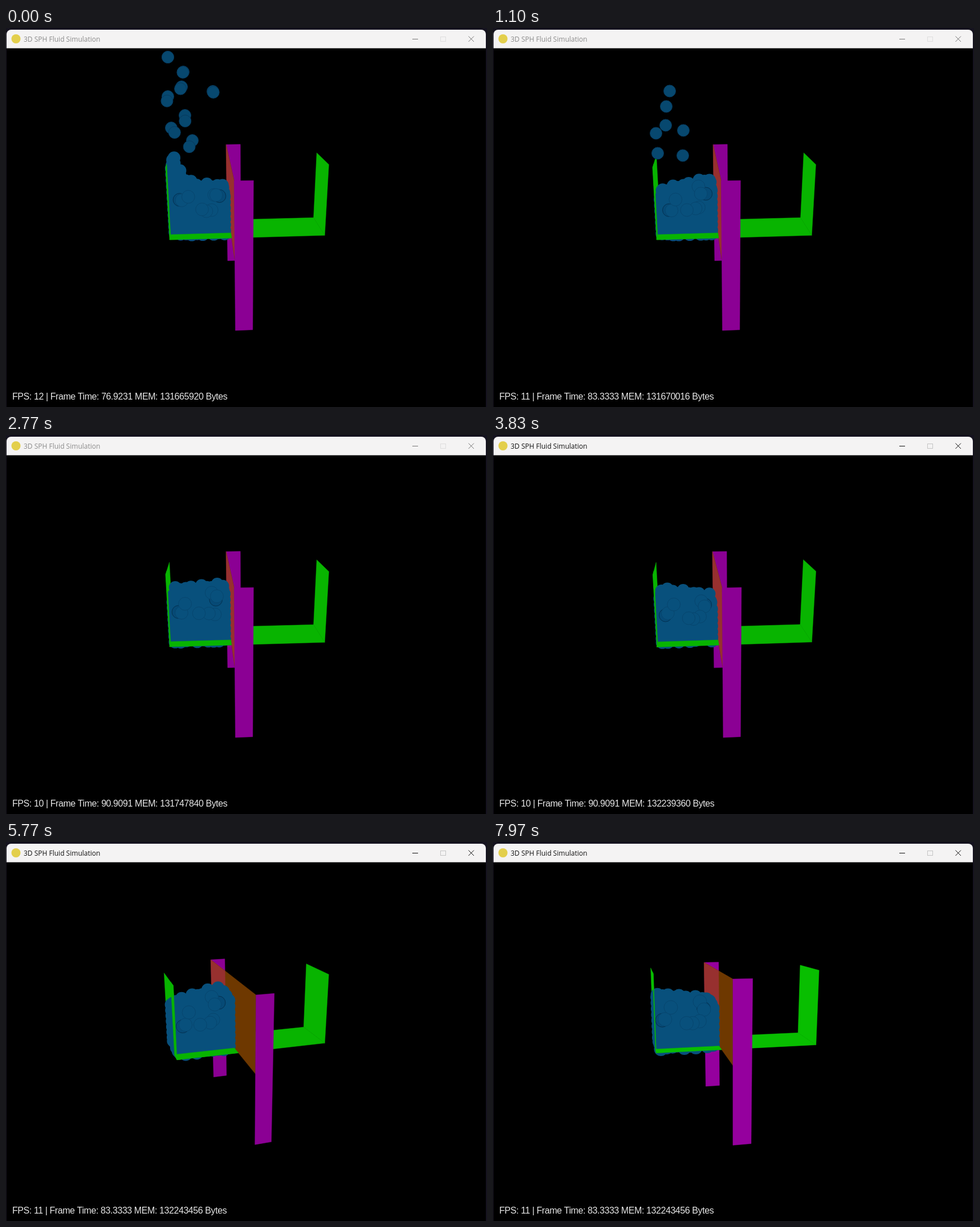
Recreate the animation shown at these times as an HTML page with a canvas. Size 844x664 px, loop 8 s.

```html
<!DOCTYPE html>
<html lang="en">
<head>
<meta charset="utf-8">
<title>3D SPH Fluid Simulation</title>
<style>
  html, body { margin: 0; width: 100%; height: 100%; overflow: hidden; background: #000; }
  canvas { display: block; }
</style>
</head>
<body>
<canvas id="stage" width="844" height="664"></canvas>
<script>
const ctx = document.getElementById('stage').getContext('2d');
const LOOP = 8000, FOCUS_TIME = 3720;
const FOCAL = 880, CENTER_X = 421, CENTER_Y = 350.5;

// Scene in world units: x right, y up, z toward the viewer. The tank floor is y = 0.
const TANK_X = 4.72, TANK_Z = 1.67, HEIGHT = 4.42, POST_Z = 4.95, SHEET_X = -1;
const RADIUS = 0.4, FLUID_LEFT = -4.42, FLUID_RIGHT = -1.4, FLUID_BACK = -1.45, FLUID_FRONT = 1.05;
const BLUE = '#08507c', SPRAY_BLUE = '#07486f', RIM = '#063a5e';

// time, yaw, pitch, distance
const CAMERA = [
  [0, .079, .352, 32], [3750, .079, .352, 32], [4670, .187, .352, 32], [5650, .302, .352, 32],
  [5950, .302, .352, 32], [6600, .277, .24, 30.6], [6750, .277, .24, 30.6], [7600, .199, .24, 30.6]];

// time, mean fluid level, slosh (right side minus left side)
const SLOSH = [[0, 2.4, 0], [1100, 2.5, .7], [2770, 2.8, .2], [4670, 2.2, -1], [5770, 2.9, .7],
  [6670, 2.75, .1], [7970, 2.6, -.35]];

// Screen positions of splashing drops: at the start, and when the second shower is mid-air.
const SPLASH = [[284, 51], [311, 77], [308, 103], [363, 111], [284, 120], [314, 153], [290, 175], [327, 197]];
const SHOWER_TIME = 1.1;
const SHOWER = [[310, 110], [304, 137], [303, 170], [286, 184], [334, 179], [289, 219], [333, 223]];

// time, frames per second, memory
const STATUS = [[0, 12, 131665920], [620, 11, 131670016], [2100, 10, 131747840], [3800, 10, 132239360],
  [4850, 11, 132239360], [5400, 11, 132243456], [6300, 10, 132243456], [7300, 11, 132243456]];

const mix = (a, b, k) => a + (b - a) * k;

function sample(rows, t) {
  const i = rows.findIndex(row => row[0] > t);
  if (i < 0) return rows[rows.length - 1];
  const from = rows[i - 1], to = rows[i], k = (t - from[0]) / (to[0] - from[0]);
  return from.map((v, j) => mix(v, to[j], k));
}

function randomizer(seed) {
  return () => (seed = seed * 16807 % 2147483647) / 2147483647;
}

// Returns a function from world point to [screen x, screen y, pixels per unit].
function makeCamera([, yaw, pitch, distance]) {
  const cy = Math.cos(yaw), sy = Math.sin(yaw), cp = Math.cos(pitch), sp = Math.sin(pitch);
  return ([x, y, z]) => {
    const depth = z * cy - x * sy;
    const scale = FOCAL / (distance - depth * cp - y * sp);
    return [CENTER_X + (x * cy + z * sy) * scale, CENTER_Y - (y * cp - depth * sp) * scale, scale];
  };
}

// Rectangles parallel to the axes, as lists of corners.
const facing = (x0, x1, y0, y1, z) => [[x0, y1, z], [x1, y1, z], [x1, y0, z], [x0, y0, z]];
const sideways = (x, y0, y1, z0, z1) => [[x, y1, z0], [x, y1, z1], [x, y0, z1], [x, y0, z0]];
const level = (x0, x1, y, z0, z1) => [[x0, y, z0], [x1, y, z0], [x1, y, z1], [x0, y, z1]];

function tracePath(points) {
  ctx.beginPath();
  points.forEach(([x, y]) => ctx.lineTo(x, y));
  ctx.closePath();
}

function polygon(points, color) {
  tracePath(points);
  ctx.fillStyle = ctx.strokeStyle = color;
  ctx.lineWidth = .5;
  ctx.fill();
  ctx.stroke();
}

function disc(x, y, r, color, rim) {
  ctx.beginPath();
  ctx.arc(x, y, r, 0, 7);
  ctx.fillStyle = color;
  ctx.fill();
  ctx.strokeStyle = rim;
  ctx.lineWidth = 1;
  ctx.stroke();
}

function drawSpray(seconds) {
  const fall = (x, y, dt, speed) => {
    y += speed * dt + 200 * dt * dt;
    if (y < 330) disc(x, y, 10.5, SPRAY_BLUE, RIM);
  };
  const random = randomizer(77);
  SPLASH.forEach(([x, y], i) => {
    fall(x, y, seconds, 60);
    fall(x + (random() - .5) * 2 * i, y + i * random() * 2, seconds, 60);
  });
  SHOWER.forEach(([x, y]) => fall(x, y, seconds - SHOWER_TIME, 440));
}

function drawFluid(t, project) {
  const [, mean, tilt] = sample(SLOSH, t);
  const splash = 1.9 * Math.exp(-t / 350);
  const surface = (u, phase) => mean + tilt * (u - .5) + splash * Math.exp(-6 * u)
    + .14 * Math.sin(phase * 2.4 + t / 350);

  const columns = 10, layers = 5, step = .36;
  ctx.beginPath();
  for (let i = 0; i < columns; i++) for (let j = 0; j < layers; j++) {
    const u = i / (columns - 1), top = surface(u, i + j * 1.7);
    const x = mix(FLUID_LEFT, FLUID_RIGHT, u), z = mix(FLUID_BACK, FLUID_FRONT, j / (layers - 1));
    for (let y = top; y > -.1; y -= step) {
      const [sx, sy, scale] = project([x, Math.max(y, .05), z]);
      ctx.moveTo(sx, sy);
      ctx.arc(sx, sy, RADIUS * scale, 0, 7);
    }
  }
  ctx.fillStyle = BLUE;
  ctx.fill();

  // A few drifting particles show their outline inside the fluid.
  const random = randomizer(41);
  for (let i = 0; i < 9; i++) {
    const u = .1 + .8 * random(), y = (.3 + .7 * random()) * surface(u, i);
    const x = mix(FLUID_LEFT, FLUID_RIGHT, u) + .12 * Math.sin(t / 700 + i);
    const [sx, sy, scale] = project([x, y, 0]);
    disc(sx, sy, RADIUS * scale, i < 2 ? '#064a76' : BLUE, i < 2 ? '#04304f' : '#07466f');
  }
}

function drawScene(t) {
  const view = sample(CAMERA, t), project = makeCamera(view);
  const face = (corners, color) => polygon(corners.map(project), color);
  const glow = 10 * (.352 - view[2]) / .112;
  const green = `rgb(8,${180 + glow},0)`, purple = `rgb(${139 + glow},0,${148 + glow})`;
  const post = z => facing(SHEET_X, SHEET_X + 1, -HEIGHT, HEIGHT, z);
  const sheet = sideways(SHEET_X, 0, HEIGHT, -POST_Z, POST_Z);

  face(post(-POST_Z), purple);
  face(level(-TANK_X, TANK_X, 0, -TANK_Z, TANK_Z), green);
  face(sideways(TANK_X, 0, HEIGHT, -TANK_Z, TANK_Z), green);
  face(sideways(-TANK_X, 0, HEIGHT, -TANK_Z, TANK_Z), green);

  face(sheet, '#6e3800');
  ctx.save();
  tracePath(sheet.map(project));
  ctx.clip();
  face(post(-POST_Z), '#97302f');
  ctx.restore();

  drawSpray(t / 1000);
  drawFluid(t, project);

  // The front part of the tank stays in front of the fluid.
  face(level(-TANK_X, SHEET_X, 0, .8, TANK_Z), green);
  face(sideways(-TANK_X, 0, HEIGHT, .8, TANK_Z), green);

  face(post(POST_Z), purple);
}

function strokeLines(...lines) {
  ctx.beginPath();
  for (const [x0, y0, x1, y1] of lines) {
    ctx.moveTo(x0, y0);
    ctx.lineTo(x1, y1);
  }
  ctx.stroke();
}

function drawWindow(active) {
  ctx.fillStyle = '#15131f';
  ctx.fillRect(0, 0, 844, 664);
  ctx.fillStyle = '#000';
  ctx.fillRect(1, 30, 841, 634);
  ctx.fillStyle = '#f4f3f3';
  ctx.beginPath();
  ctx.roundRect(1, 3, 841, 32.5, [8, 8, 0, 0]);
  ctx.fill();

  ctx.fillStyle = '#e3cf4c';
  ctx.beginPath();
  ctx.arc(17.5, 19, 8, 0, 7);
  ctx.fill();

  ctx.font = '12px "Open Sans", sans-serif';
  ctx.letterSpacing = '0px';
  ctx.fillStyle = active ? '#111' : '#8b8b8b';
  ctx.fillText('3D SPH Fluid Simulation', 31, 23.5);

  ctx.lineWidth = 1;
  ctx.strokeStyle = active ? '#111' : '#777';
  strokeLines([713, 19.5, 723, 19.5], [811.5, 14.5, 821, 24], [821, 14.5, 811.5, 24]);
  ctx.strokeStyle = active ? '#c4c4c4' : '#dedede';
  ctx.strokeRect(762.5, 15.5, 9, 8);
}

function drawStatus(t) {
  const [, fps, memory] = STATUS.findLast(row => row[0] <= t);
  ctx.font = '16px "Liberation Sans", Arial, sans-serif';
  ctx.letterSpacing = '-0.42px';
  ctx.fillStyle = '#e6e6e6';
  ctx.fillText(`FPS: ${fps} | Frame Time: ${(1000 / (fps + 1)).toFixed(4)} MEM: ${memory} Bytes`, 11, 651);
}

function draw(now) {
  const t = Math.max(0, now) % LOOP;
  drawWindow(t >= FOCUS_TIME);
  ctx.save();
  ctx.beginPath();
  ctx.rect(1, 36, 841, 628);
  ctx.clip();
  drawScene(t);
  drawStatus(t);
  ctx.restore();
}

const start = performance.now();
function tick() {
  draw(performance.now() - start);
  requestAnimationFrame(tick);
}
tick();
</script>
</body>
</html>
```
